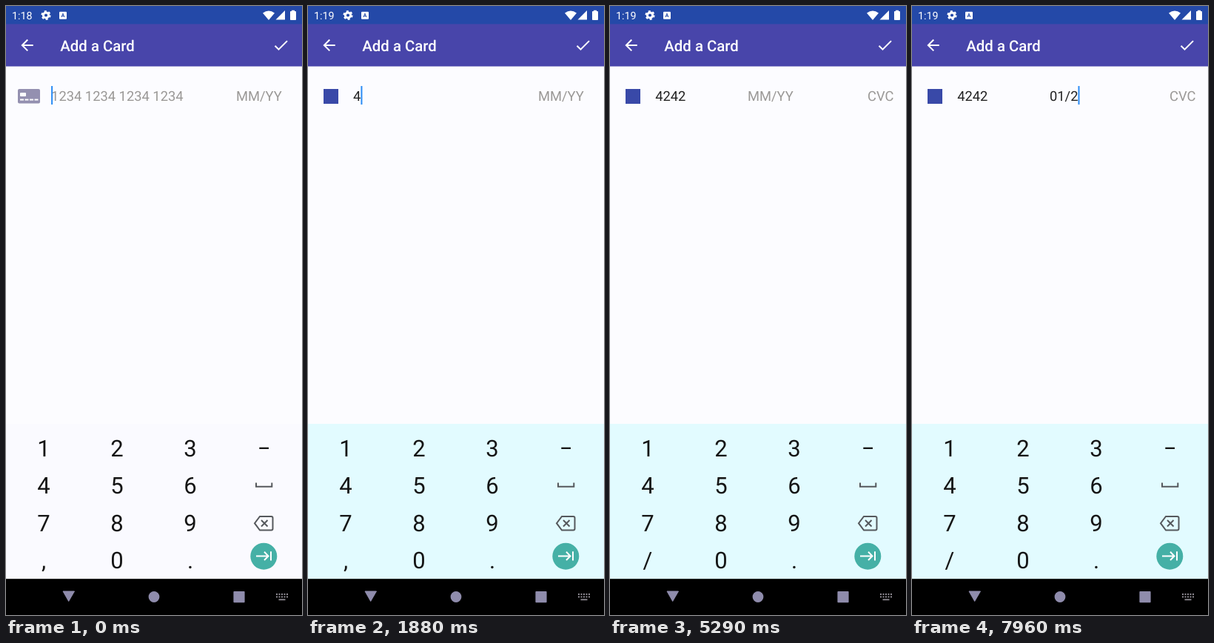
An HTML page for the animation above (8000 ms loop, 400 px wide and 822 px high).

```html
<!DOCTYPE html>
<html lang="en">
<head>
<meta charset="utf-8">
<title>Add a Card</title>
<style>
  html, body { margin: 0; width: 100%; height: 100%; overflow: hidden; background: #fcfcff; }
  svg { display: block; width: 100%; height: 100%; }
  text { font-family: Roboto, sans-serif; white-space: pre; text-rendering: geometricPrecision; }
  .field { font-size: 18.33px; fill: #222; }
  .hint { fill: #9a9896; }
  .key { font-size: 31px; fill: #151515; text-anchor: middle; }
  .line { fill: none; stroke: #55585c; stroke-width: 2; }
</style>
</head>
<body>
<svg viewBox="0 0 400 822">
  <clipPath id="numberClip"><rect x="60" y="100" width="245" height="44"/></clipPath>

  <rect width="400" height="822" fill="#fcfcff"/>
  <rect y="24" width="400" height="57.500" fill="#4845aa"/>
  <rect width="400" height="24.400" fill="#2449a8"/>

  <!-- Status bar -->
  <g fill="#fff">
    <text id="clock" x="8" y="18" font-size="14.26"></text>
    <circle cx="54" cy="12.500" r="3.600" fill="none" stroke="#fff" stroke-width="3"/>
    <circle cx="54" cy="12.500" r="5.600" fill="none" stroke="#fff" stroke-width="2" stroke-dasharray="2.930"/>
    <rect x="72" y="7.700" width="10" height="10" rx="1"/>
    <text x="77" y="15.300" font-size="7.2" font-weight="700" text-anchor="middle" style="fill:#2449a8">A</text>
    <path d="M347 9.500Q355 3.500 363 9.500L355 19Z"/>
    <path d="M377 6V18.500H364.500Z"/>
    <path d="M386 7V5.800H390V7H391.200Q392 7 392 8V18Q392 19 391.200 19H384.800Q384 19 384 18V8Q384 7 384.800 7Z"/>
  </g>

  <!-- App bar -->
  <g fill="#fff">
    <path transform="translate(16.300 40.700) scale(1.020)" d="M20 11H7.830l5.590-5.590L12 4l-8 8 8 8 1.410-1.410L7.830 13H20z"/>
    <path transform="translate(359.300 40.700) scale(1.020)" d="M9 16.170L4.830 12l-1.420 1.410L9 19 21 7l-1.410-1.410z"/>
    <text x="73.300" y="60.900" font-size="20.37" font-weight="500">Add a Card</text>
  </g>

  <!-- Card form -->
  <g id="blankCard">
    <rect x="16" y="112" width="30" height="19.500" rx="2" fill="#9490b0"/>
    <rect x="19" y="117" width="8" height="5" rx="1" fill="#fff"/>
    <path d="M19 126.500H44" stroke="#fff" stroke-width="2" stroke-dasharray="5 1.500"/>
  </g>
  <rect id="brand" x="21" y="112" width="20" height="20" fill="#3949a8"/>
  <g clip-path="url(#numberClip)"><text id="number" class="field" y="127.700"></text></g>
  <text id="expiry" class="field" y="127.700"></text>
  <text id="cvc" class="field hint" y="127.700">CVC</text>
  <rect id="caret" y="108" width="2" height="25" fill="#2b8cf5"/>

  <!-- Keyboard -->
  <rect y="564" width="400" height="210" fill="#fafaff"/>
  <rect id="keyTint" y="564" width="400" height="210" fill="#e2fbff"/>
  <g id="keys"></g>
  <rect x="342.300" y="595.700" width="12.700" height="2.300" fill="#151515"/>
  <path class="line" d="M338 643.500V648.800H359.300V643.500"/>
  <path class="line" d="M343 689H358.500Q360.500 689 360.500 691V705.500Q360.500 707.500 358.500 707.500H343L336 698.200ZM345 694L353.500 702.500M353.500 694L345 702.500"/>
  <circle cx="348.300" cy="742.700" r="18" fill="#45b0a6"/>
  <path d="M338 742.400H354M349 736.800L354.500 742.400L349 748M358 736.300V748.600" fill="none" stroke="#fff" stroke-width="2"/>

  <!-- Navigation bar -->
  <rect y="773.200" width="400" height="49" fill="#000"/>
  <g fill="#8f8cac">
    <path d="M77 790H92.500L84.700 803.500Z" stroke="#8f8cac" stroke-linejoin="round"/>
    <circle cx="200" cy="797.500" r="7.400"/>
    <rect x="307.400" y="790" width="15.200" height="15.200" rx="1"/>
  </g>
  <path d="M365 794H381M365 797.500H381" stroke="#8f8c94" stroke-width="2" stroke-dasharray="2 1.500"/>
  <path d="M368.500 801.300H377.500" stroke="#8f8c94" stroke-width="1.800"/>
</svg>

<script>
const $ = id => document.getElementById(id);
const LOOP = 8000, FIELD_X = 61.1;
const MINUTE_CHANGE = 630;
const FIRST_DIGIT = 1700, DIGIT_STEP = 200, DIGITS = 16;
const SLIDE_START = FIRST_DIGIT + DIGIT_STEP * (DIGITS - 1), SLIDE_TIME = 150;
const expirySteps = [[SLIDE_START, ""], [5300, "0"], [5720, "01/"], [6900, "01/2"]];

$("keys").innerHTML = ["123", "456", "789", ",0."].map((row, r) =>
  [...row].map((char, c) =>
    `<text class="key" x="${51 + 99 * c}" y="${607.6 + 50.6 * r}">${char}</text>`).join("")).join("");
const cornerKey = $("keys").children[9];

const clamp = v => Math.max(0, Math.min(1, v));
const ease = v => (1 - Math.cos(Math.PI * clamp(v))) / 2;
const show = (id, visible) => $(id).setAttribute("visibility", visible ? "visible" : "hidden");

// Fills a field and returns the x position of its caret.
function setField(id, x, value, hint) {
  const field = $(id);
  field.setAttribute("x", x);
  field.textContent = value || hint;
  field.classList.toggle("hint", !value);
  return x + (value ? field.getComputedTextLength() : 0);
}

function draw(t) {
  const count = t < FIRST_DIGIT ? 0
    : Math.min(DIGITS, 1 + Math.floor((t - FIRST_DIGIT) / DIGIT_STEP));
  const number = "4242 ".repeat(4).slice(0, count + Math.min(3, Math.floor(count / 4)));
  const inExpiry = t >= SLIDE_START;
  const slide = ease((t - SLIDE_START) / SLIDE_TIME);
  const [expiryTime, expiry] = expirySteps.filter(([at]) => t >= at).pop() || [0, ""];

  const numberEnd = setField("number", FIELD_X - 137.2 * slide, number, "1234 1234 1234 1234");
  const expiryEnd = setField("expiry", 311 - 125 * slide, expiry, "MM/YY");
  $("cvc").setAttribute("x", 473 - 125 * slide);

  const lastInput = inExpiry ? expiryTime : count ? FIRST_DIGIT + (count - 1) * DIGIT_STEP : 0;
  $("caret").setAttribute("x", inExpiry ? expiryEnd : numberEnd);
  show("caret", (t - lastInput) % 1000 < 500);
  show("blankCard", !count);
  show("brand", count);

  $("clock").textContent = t < MINUTE_CHANGE ? "1:18" : "1:19";
  $("keyTint").setAttribute("opacity", clamp((t - 40) / 280));
  cornerKey.textContent = inExpiry ? "/" : ",";
}

const start = performance.now();
function tick() {
  draw((performance.now() - start) % LOOP);
  requestAnimationFrame(tick);
}
tick();
</script>
</body>
</html>
```
